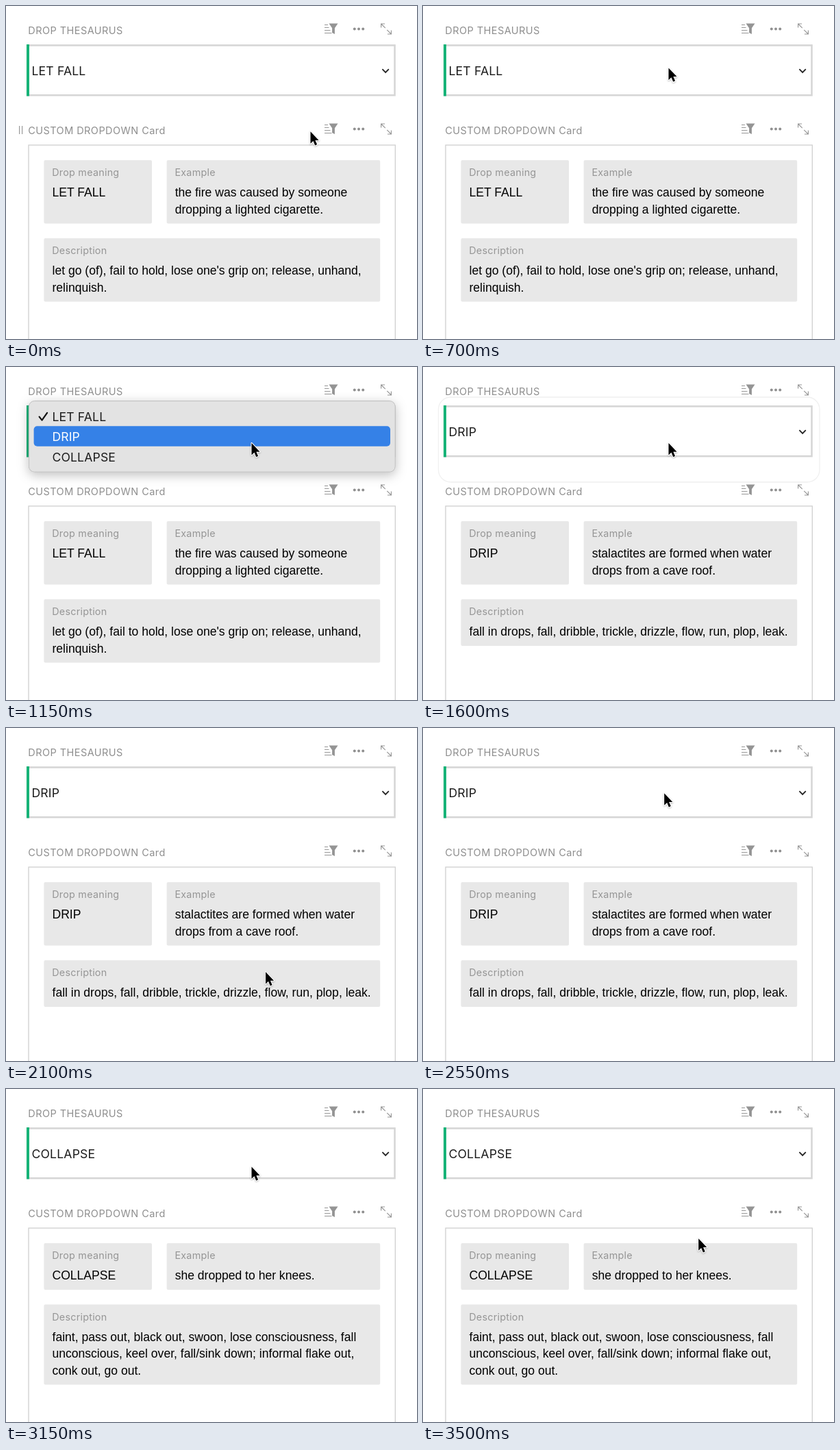
Write an HTML page that moves like this. It is 600x486 px and loops after 4290 ms.

```html
<!DOCTYPE html>
<html lang="en">
<head>
<meta charset="utf-8">
<title>Drop thesaurus</title>
<style>
  html, body { margin: 0; width: 100%; height: 100%; overflow: hidden; background: #fff; }
  svg { display: block; width: 600px; height: 486px; }
  text { white-space: pre; }
  .title { font: 14.5px Inter, "Open Sans", sans-serif; letter-spacing: .44px; fill: #8e8e8e; }
  .label { font: 14.3px Inter, "Open Sans", sans-serif; letter-spacing: .27px; fill: #959595; }
  .value { font: 17.56px "Liberation Sans", Arial, sans-serif; fill: #000; }
  .option { font: 17.6px Inter, "Open Sans", sans-serif; letter-spacing: .16px; fill: #1c1c1c; }
  .line { fill: none; stroke: #979797; stroke-width: 1.15; }
  .field { fill: #e8e8e8; }
</style>
</head>
<body>
<svg id="stage" viewBox="0 0 600 486" xmlns="http://www.w3.org/2000/svg">
  <defs>
    <filter id="shadow" x="-10%" y="-40%" width="120%" height="190%">
      <feDropShadow dx="0" dy="4" stdDeviation="8" flood-color="#000" flood-opacity=".25"/>
    </filter>
    <filter id="soft" x="-50%" y="-50%" width="200%" height="200%">
      <feDropShadow dx="0" dy="1" stdDeviation="1" flood-color="#000" flood-opacity=".3"/>
    </filter>
    <g id="tools">
      <path class="line" d="M465 27.5h5M465 31.5h6.5M465 35.5h8.5M465 39.5h10.5"/>
      <path fill="#949494" d="M471.5 25.5h13l-4.6 6.8v8.7l-3.8-2v-6.7z"/>
      <g fill="#8f8f8f">
        <circle cx="508.8" cy="33.4" r="2"/><circle cx="515" cy="33.4" r="2"/><circle cx="521.2" cy="33.4" r="2"/>
      </g>
      <path class="line" d="M547.6 31.5V26h5.5M547.6 26l6.2 6.2M562.4 35.5v5.5h-5.5M562.4 41l-6.2-6.2"/>
    </g>
  </defs>
  <rect width="600" height="486" fill="#fff"/>

  <text class="title" x="32.3" y="40.5">DROP THESAURUS</text>
  <use href="#tools"/>
  <rect x="31.2" y="57.4" width="536.3" height="72.8" fill="#fff" stroke="#d6d6d6" stroke-width="2.6"/>
  <rect x="30" y="56" width="4" height="75.5" fill="#17b378"/>
  <text id="choice" class="option" x="37.5" y="100.7"></text>
  <path d="M549.4 92.2l4.7 4.7 4.7-4.7" fill="none" stroke="#222" stroke-width="1.8"/>

  <path id="handle" class="line" d="M19.6 175v12M23.6 175v12"/>
  <text class="title" x="32.3" y="186.5">CUSTOM DROPDOWN Card</text>
  <use href="#tools" y="146"/>
  <rect x="33" y="203" width="535.3" height="300" fill="#fff" stroke="#cfcfcf" stroke-width="1.3"/>
  <g id="card"></g>

  <rect id="afterglow" x="22.5" y="44" width="556.5" height="124" rx="18" fill="none" stroke="#f0f0f0" stroke-width="1.3"/>
  <g id="menu"></g>
  <path id="cursor" d="M0 0V17.5l4-3.7 2.7 6.4 2.9-1.3-2.7-6.2h5.2z" fill="#000" stroke="#fff"
        stroke-width="2" stroke-linejoin="round" paint-order="stroke" filter="url(#soft)"/>
</svg>
<script>
const LOOP = 4290, STEP = 50;
const ROW = 29.6, LINE = 24.5, FIELD = 68;

const entries = [
  { name: "LET FALL",
    example: ["the fire was caused by someone", "dropping a lighted cigarette."],
    description: ["let go (of), fail to hold, lose one's grip on; release, unhand,", "relinquish."] },
  { name: "DRIP",
    example: ["stalactites are formed when water", "drops from a cave roof."],
    description: ["fall in drops, fall, dribble, trickle, drizzle, flow, run, plop, leak."] },
  { name: "COLLAPSE",
    example: ["she dropped to her knees."],
    description: ["faint, pass out, black out, swoon, lose consciousness, fall",
      "unconscious, keel over, fall/sink down; informal flake out,", "conk out, go out."] }
];

// Menu sessions: when open, when the pointer picks the next row, when closed.
const sessions = [
  { open: 750, hover: 850, close: 1600, current: 0 },
  { open: 2600, hover: 2650, close: 3050, current: 1 }
];

// Pointer path: time, x, y
const path = [
  [200, 444.5, 183.2], [500, 358.5, 91.2], [700, 358.5, 90.4], [850, 358.5, 90.4], [1150, 358.5, 111],
  [1850, 358.5, 111], [2100, 379, 356], [2150, 380, 357], [2400, 352.2, 99],
  [2550, 352.2, 95.2], [2650, 352.2, 95.2], [2850, 352.2, 98.3], [3050, 352.2, 98.3], [3500, 402.2, 218.3]
];

const el = id => document.getElementById(id);
const show = (node, on) => node.setAttribute("visibility", on ? "visible" : "hidden");
const ease = u => u * u * (3 - 2 * u);
const text = (cls, x, y, s, extra = "") => `<text class="${cls}" x="${x}" y="${y}" ${extra}>${s}</text>`;

function pointerAt(t) {
  const next = path.findIndex(p => p[0] > t);
  if (next === 0) return path[0].slice(1);
  if (next < 0) return path[path.length - 1].slice(1);
  const [t0, x0, y0] = path[next - 1], [t1, x1, y1] = path[next];
  const u = ease((t - t0) / (t1 - t0));
  return [x0 + (x1 - x0) * u, y0 + (y1 - y0) * u];
}

function field(x, y, width, height, label, lines) {
  return `<rect class="field" x="${x}" y="${y}" width="${width}" height="${height}" rx="2"/>` +
    text("label", x + 11.8, y + 23, label) +
    lines.map((s, i) => text("value", x + 12.1, y + 53.3 + i * LINE, s)).join("");
}

function cardMarkup({ name, example, description }) {
  const height = lines => FIELD + LINE * (lines.length - 1);
  const top = 225, h = height(example);
  return field(55.4, top, 157.6, h, "Drop meaning", [name]) +
    field(234.6, top, 311.6, h, "Example", example) +
    field(55.4, top + h + 21.6, 490.8, height(description), "Description", description);
}

function menuMarkup(current, active) {
  const top = 57 - current * ROW;
  let out = `<rect x="33.4" y="${top - 7.4}" width="534.8" height="${ROW * 3 + 14.8}" rx="8"
    fill="#e3e3e3" stroke="#b9b9b9" stroke-width=".9" filter="url(#shadow)"/>`;
  entries.forEach(({ name }, i) => {
    const y = top + i * ROW, on = i === active;
    if (on) out += `<rect x="40.6" y="${y - .4}" width="520.4" height="${ROW}" rx="5" fill="#3581e7"/>`;
    if (i === current) out += `<path d="M48.6 ${y + 15.6}l3.9 5 7.6-10.8" fill="none"
      stroke="${on ? "#fff" : "#111"}" stroke-width="2.2" stroke-linecap="round" stroke-linejoin="round"/>`;
    out += text("option", 67.4, y + 21.5, name, on ? 'style="fill:#fff"' : "");
  });
  return out;
}

let shownCard, shownMenu;

function render(time) {
  const t = Math.floor(time % LOOP / STEP) * STEP;

  const selected = sessions.filter(s => t >= s.close).length;
  if (selected !== shownCard) {
    shownCard = selected;
    el("choice").textContent = entries[selected].name;
    el("card").innerHTML = cardMarkup(entries[selected]);
  }

  const session = sessions.find(s => t >= s.open && t < s.close);
  const markup = session ? menuMarkup(session.current, session.current + (t >= session.hover ? 1 : 0)) : "";
  if (markup !== shownMenu) el("menu").innerHTML = shownMenu = markup;

  const closing = sessions.find(s => t >= s.close && t < s.close + STEP);
  show(el("afterglow"), closing);
  if (closing) el("afterglow").setAttribute("y", 44 - closing.current * ROW);

  const [x, y] = pointerAt(t);
  el("cursor").setAttribute("transform", `translate(${x} ${y})`);
  show(el("handle"), y > 165 && y < 203);
}

const start = performance.now();
function tick() {
  render(performance.now() - start);
  requestAnimationFrame(tick);
}
tick();
</script>
</body>
</html>
```
